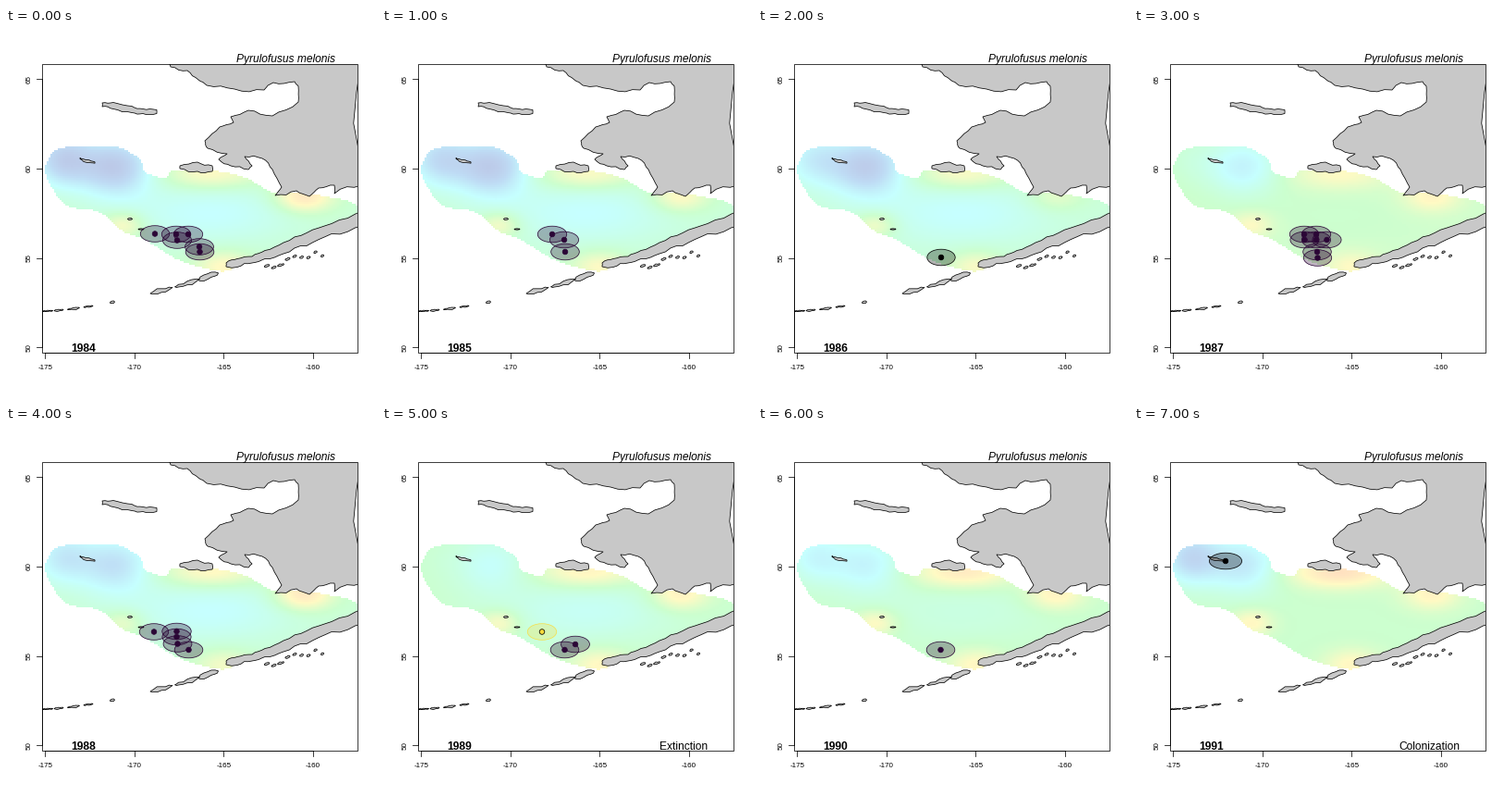
A matplotlib script that plays this animation: 400x400 px, repeating every 8000 ms.

```python
import numpy as np
import matplotlib.pyplot as plt
from matplotlib.animation import ArtistAnimation
from matplotlib.colors import LinearSegmentedColormap
from matplotlib.patches import Circle, Ellipse, Polygon, Rectangle
from matplotlib.path import Path

PX = 0.72  # one pixel in points at 100 dpi
THIN = 0.75 * PX
DEG = 19.32  # pixels per degree
LAND = "#c8c8c8"
DARK = "#2b0636"
LEFT, TOP, RIGHT, BOTTOM = 39, 39, 380, 351

rng = np.random.default_rng(7)
plt.rcParams["font.family"] = "Liberation Sans"
fig = plt.figure(figsize=(4, 4), dpi=100, facecolor="white")
ax = fig.add_axes([0, 0, 1, 1])
ax.axis("off")


def lon_x(lon):
    return 42.2 + DEG * (lon + 175)


def lat_y(lat):
    return 152 - DEG * (lat - 60)


def label(x, y, text, size=12, **kw):
    return ax.text(x, y, text, fontsize=size * PX, va="baseline", zorder=8, **kw)


def line(xs, ys):
    ax.plot(xs, ys, color="black", lw=THIN, zorder=7)


# Frame, axes and title
frame = Rectangle((LEFT, TOP), RIGHT - LEFT, BOTTOM - TOP, fill=False, lw=THIN, zorder=7)
ax.add_patch(frame)
line([lon_x(-175), lon_x(-160)], [BOTTOM] * 2)
line([LEFT] * 2, [lat_y(50), lat_y(65)])
for lon in range(-175, -159, 5):
    line([lon_x(lon)] * 2, [BOTTOM, BOTTOM + 6])
    label(lon_x(lon), 369, str(lon), 8, ha="center")
for lat in range(50, 66, 5):
    line([LEFT - 6, LEFT], [lat_y(lat)] * 2)
    ax.text(29, lat_y(lat), str(lat), fontsize=8 * PX, rotation=90,
            ha="right", va="center")
label(249, 37, "Pyrulofusus melonis", style="italic")


# Land
def rough(points, rounds=2, amount=0.1):
    """Split each edge and push its middle sideways, like a natural shore."""
    pts = np.array(points, float)
    for _ in range(rounds):
        edge = np.roll(pts, -1, axis=0) - pts
        normal = np.column_stack([-edge[:, 1], edge[:, 0]])
        shift = rng.uniform(-amount, amount, (len(pts), 1))
        mid = pts + edge / 2 + normal * shift
        pts = np.stack([pts, mid], axis=1).reshape(-1, 2)
    return pts


def land(points):
    shape = Polygon(points, fc=LAND, ec="black", lw=THIN, joinstyle="round", zorder=3)
    ax.add_patch(shape)
    shape.set_clip_path(frame)


def ribbon(spine):
    """Outline around (x, y, half height) points."""
    x, y, half = np.array(spine, float).T
    upper, lower = np.column_stack([x, y - half]), np.column_stack([x, y + half])
    land(rough(np.vstack([upper, lower[::-1]])))


def islet(x, y, w, h, slope=0.0):
    t = np.linspace(0, 2 * np.pi, 8, endpoint=False)
    dx = w / 2 * np.cos(t)
    land(rough(np.column_stack([x + dx, y + h / 2 * np.sin(t) + slope * dx]), 1, 0.2))


land(rough([  # mainland
    (176, 36), (178, 42), (196, 46), (208, 56), (217, 62), (247, 66), (279, 67),
    (289, 59), (312, 58), (316, 63), (316, 80), (288, 95), (262, 89), (243, 96),
    (246, 102), (231, 107), (215, 122), (218, 130), (239, 136), (230, 142),
    (243, 149), (262, 153), (266, 149), (258, 139), (277, 141), (288, 153),
    (298, 172), (291, 181), (314, 176), (328, 182), (338, 173), (355, 170),
    (355, 179), (384, 170), (384, 36),
]))
ribbon([  # peninsula
    (386, 205.5, 8), (352, 217, 5.5), (325, 228.5, 7), (300, 238, 6),
    (280, 245, 4.5), (266, 250.5, 3.5), (250, 254, 4.5), (238, 256, 2),
])
ribbon([(104, 83, 2), (116, 84, 3.5), (136, 88, 3.5), (148, 90, 2.5), (163, 90.5, 2)])
ribbon([(188, 150.5, 1.5), (207, 150, 5), (223, 152, 3)])
ribbon([(80, 141, 0.5), (88, 144, 1.5), (96, 145.5, 0.7)])
islet(134, 206.5, 5, 2)
islet(146, 217.5, 6, 1.6)

# Island chain along a curved arc
for x, w, h in [(218, 23, 6), (196, 27, 4), (168, 24, 4), (115, 5, 2.5),
                (89, 10, 1.6), (73, 13, 2), (57, 10, 2), (45, 11, 1.6)]:
    run = (x - 40) / 180
    islet(x, 306 - 38 * run**1.58, w, h, -0.33 * run**0.58)

# Skerries off the south shore
for x in np.linspace(282, 342, 9):
    islet(x, 258 - 0.25 * (x - 282) + rng.uniform(-4, 4), rng.uniform(3, 7), 2.5, -0.3)


# Temperature field of the survey area
def smooth(points, rounds=2):
    """Cut corners repeatedly."""
    pts = np.array(points, float)
    for _ in range(rounds):
        after = np.roll(pts, -1, axis=0)
        pts = np.stack([0.8 * pts + 0.2 * after, 0.2 * pts + 0.8 * after], axis=1)
        pts = pts.reshape(-1, 2)
    return pts


area = Path(smooth([
    (39, 154), (52, 131), (75, 127), (122, 127), (148, 143), (147, 156), (174, 164),
    (178, 152), (250, 156), (292, 181), (316, 177), (380, 188), (380, 204),
    (310, 230), (250, 254), (242, 263), (226, 263), (186, 252), (148, 227),
    (126, 221), (102, 197), (62, 194),
]))
CELL = 2
gx, gy = np.meshgrid(np.arange(38, 380, CELL) + 1, np.arange(124, 268, CELL) + 1)
inside = area.contains_points(np.column_stack([gx.ravel(), gy.ravel()]))
inside = inside.reshape(gx.shape)
heat = LinearSegmentedColormap.from_list(
    "heat", ["#bcc6e6", "#bfdcf5", "#c6ffff", "#ccffcf", "#fffac4", "#ffdcc0"]
)


def bump(x, y, rx, ry):
    return np.exp(-(((gx - x) / rx) ** 2 + ((gy - y) / ry) ** 2) / 2)


# Overall level, west, mid north, cold pool, coast, bay, southern edge
features = np.array([
    np.ones(gx.shape),
    bump(62, 142, 22, 20),
    bump(118, 150, 27, 21),
    bump(220, 200, 70, 24),
    bump(222, 158, 38, 12),
    bump(322, 182, 22, 12),
    bump(127, 213, 16, 10) + bump(236, 258, 22, 12),
])


def field(levels):
    rgba = heat(np.tensordot(levels, features, 1) / 5)
    rgba[..., 3] = inside
    return ax.imshow(rgba, extent=(38, 380, 268, 124), interpolation="nearest",
                     aspect="auto", zorder=1)


# Catches: a dot inside a ring of constant ground radius
def catch(x, y, color=DARK):
    lat = 60 - (y - 152) / DEG
    gone = color == "gold"
    edge = "#f5e04e" if gone else color
    ring = dict(width=17.4 / np.cos(np.radians(lat)), height=17.6, zorder=5)
    parts = [
        Ellipse((x, y), fc=edge, alpha=0.3, lw=0, **ring),
        Ellipse((x, y), fill=False, ec=edge, lw=THIN, **ring),
        Circle((x, y), 2.8, fc="#f5d93a" if gone else color,
               ec="black" if gone else color, lw=THIN, zorder=6),
    ]
    return [ax.add_patch(p) for p in parts]


scenes = []


def add_year(levels, catches, color=DARK, note="", gone=()):
    year = 1984 + len(scenes)
    parts = [field(levels), label(70.5, 350, str(year), weight="bold")]
    for x, y in catches:
        parts += catch(x, y, color)
    for x, y in gone:
        parts += catch(x, y, "gold")
    if note:
        parts.append(label(352, 350, note, ha="right"))
    scenes.append(parts)


t84 = np.array([2.9, -2.3, -2.6, -0.9, 1.2, 1.9, 1.2])
t86 = np.array([2.8, -1.2, -2.4, -0.8, 1.2, 0.8, 1.1])
t87 = np.array([3.1, -0.3, -1.4, -0.1, 0.9, 1.1, 0.9])
t88 = np.array([2.9, -1.4, -1.7, -0.9, 1.3, 1.9, 0.9])
t89 = np.array([3.0, -0.1, -0.9, -0.8, 1.3, 1.4, 1.1])
t91 = np.array([3.0, -2.1, -1.6, 0.0, 1.8, 1.2, 1.1])

add_year(t84, [(161, 222.5), (184, 223), (197, 223), (185, 229.5),
               (209, 236.5), (209.5, 242)])
add_year((t84 + t86) / 2, [(184, 223), (197, 229), (198, 242)])
add_year(t86, [(198, 248)], "black")
add_year(t87, [(184, 223), (197, 223), (184.5, 229), (197, 229),
               (208.5, 229), (198, 242), (198.5, 248.5)])
add_year(t88, [(160, 222.5), (184.5, 222), (184.5, 228), (185.5, 235.5),
               (197.5, 242)])
add_year(t89, [(209, 236), (197.5, 242)], note="Extinction", gone=[(173, 222.5)])
add_year((t89 + t91) / 2, [(197.5, 242)])
add_year(t91, [(99, 146)], "black", note="Colonization")

ax.set_xlim(0, 400)
ax.set_ylim(400, 0)
anim = ArtistAnimation(fig, scenes, interval=1000, repeat=True, repeat_delay=0)
plt.show()
```
